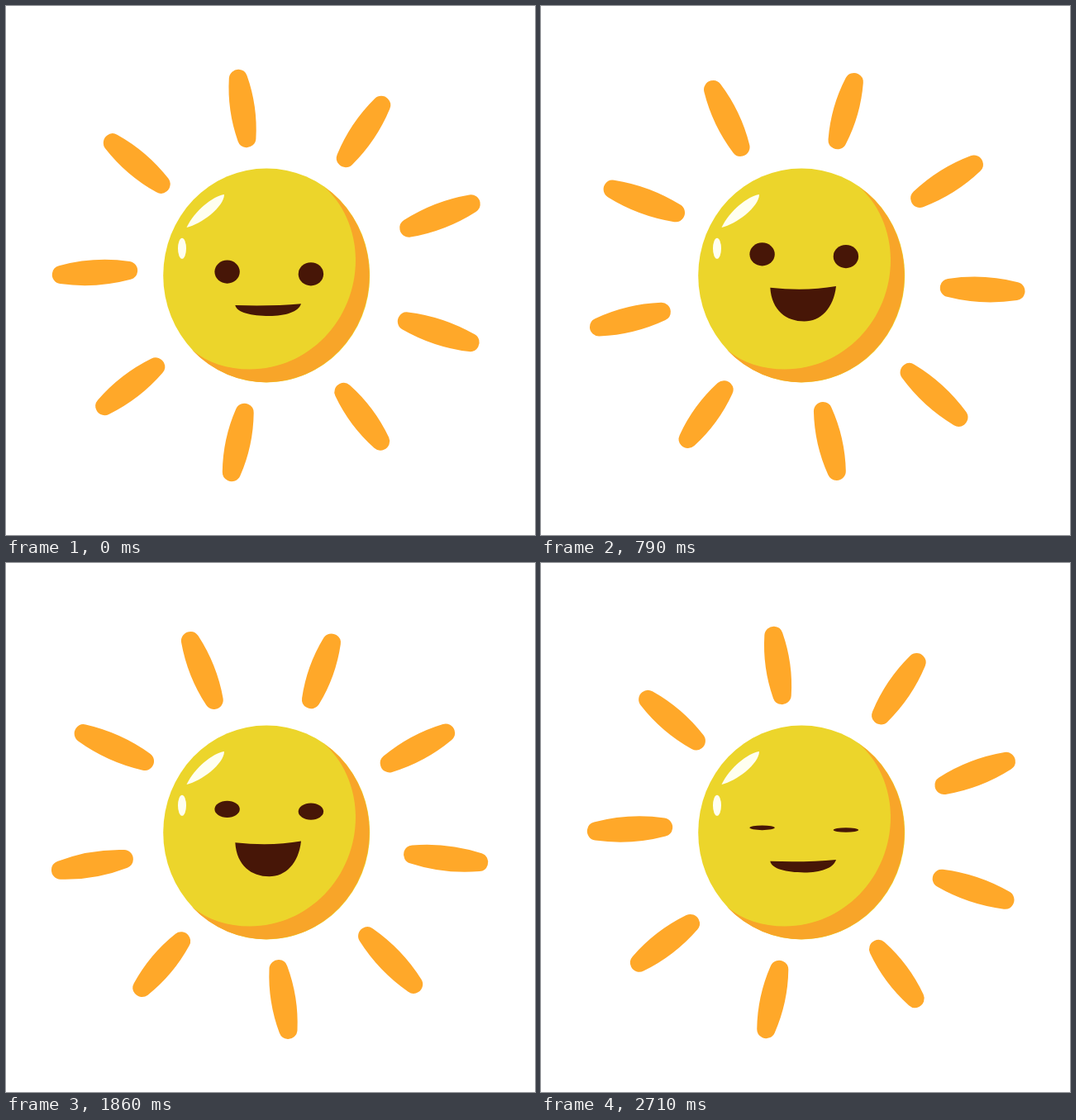
Animation, 640 px wide and 640 px high, one loop 2.78 s. Source, as an HTML page with a canvas:

```html
<!DOCTYPE html>
<html lang="en">
<head>
<meta charset="utf-8">
<title>Smiling sun</title>
<style>
  html, body { margin: 0; width: 100%; height: 100%; overflow: hidden; background: #fff; }
  canvas { display: block; width: 100vmin; height: 100vmin; }
</style>
</head>
<body>
<canvas id="stage" width="640" height="640"></canvas>
<script>
const ctx = document.getElementById('stage').getContext('2d');
const LOOP = 2780, STEPS = 39, CYCLE = 60;
const RAY = '#ffa829', SHADE = '#f8a529', YELLOW = '#ecd52b', DARK = '#471607', SHINE = '#fffff0';

// Ray ends: outer x, y, inner x, y
const rays = [
  [281, 88, 291.2, 160], [454, 120, 411, 184], [562.5, 239.5, 487.5, 268.5],
  [561.5, 407, 485, 381.5], [453, 526.5, 408.5, 467], [273, 564, 288.5, 492],
  [119.5, 484, 181, 436.5], [67, 325, 148, 320], [129, 165.5, 187.5, 215.5]
];

const crescent = new Path2D('M384 218A125 129.5 0 1 1 225 416C244 432 268 439.5 295 439.5' +
  'C366 439.5 423 380 423 307C423 272 408 238 384 218Z');
const glint = new Path2D('M264 228C250 230 228 248 218.5 268C236 264 264 243 264 228Z');

const smooth = (from, to, x) => {
  const u = Math.min(1, Math.max(0, (x - from) / (to - from)));
  return u * u * (3 - 2 * u);
};

function ellipse(x, y, rx, ry, color) {
  ctx.fillStyle = color;
  ctx.beginPath();
  ctx.ellipse(x, y, rx, ry, 0, 0, Math.PI * 2);
  ctx.fill();
}

function fill(path, color) {
  ctx.fillStyle = color;
  ctx.fill(path);
}

// Rounded bar whose sides bulge and meet both end caps smoothly
function drawRay([x1, y1, x2, y2]) {
  const r = 11.2, tilt = 0.2, quarter = Math.PI / 2;
  const length = Math.hypot(x2 - x1, y2 - y1);
  const bulge = r * Math.cos(tilt) + (length / 2 + r * Math.sin(tilt)) * Math.tan(tilt);
  const endX = length + r * Math.sin(tilt);
  ctx.save();
  ctx.translate(x1, y1);
  ctx.rotate(Math.atan2(y2 - y1, x2 - x1));
  ctx.beginPath();
  ctx.arc(0, 0, r, quarter + tilt, 3 * quarter - tilt);
  ctx.quadraticCurveTo(length / 2, -bulge, endX, -r * Math.cos(tilt));
  ctx.arc(length, 0, r, tilt - quarter, quarter - tilt);
  ctx.quadraticCurveTo(length / 2, bulge, -r * Math.sin(tilt), r * Math.cos(tilt));
  ctx.fill();
  ctx.restore();
}

function drawMouth(y, depth) {
  ctx.fillStyle = DARK;
  ctx.beginPath();
  ctx.moveTo(277.3, y);
  ctx.quadraticCurveTo(321, y + depth * 0.11, 357, y - 1.8);
  ctx.bezierCurveTo(354, y + depth * 0.62, 338, y + depth, 318.5, y + depth);
  ctx.bezierCurveTo(297, y + depth, 279, y + depth * 0.68, 277.3, y);
  ctx.fill();
}

function draw(time) {
  const step = Math.floor(time % LOOP / (LOOP / STEPS) + 0.05) % STEPS;
  const k = Math.round(step * (CYCLE + 1) / STEPS);
  const swing = 1 - Math.abs(2 * k / CYCLE - 1);
  const lift = 37.5 * swing;
  const smile = smooth(0, 18, k) - smooth(49, 60, k);
  const blink = smooth(33, 38, k) - smooth(38, 43, k) + smooth(49.4, 54.4, k);
  const eyeHeight = 14.1 * (1 - 0.8 * blink);

  ctx.clearRect(0, 0, 640, 640);

  ctx.save();
  ctx.translate(320, 320);
  ctx.rotate(smooth(0, 1, swing) * 40 * Math.PI / 180);
  ctx.translate(-320, -320);
  ctx.fillStyle = RAY;
  rays.forEach(drawRay);
  ctx.restore();

  ellipse(315.2, 325.9, 125, 129.5, YELLOW);
  fill(crescent, SHADE);
  fill(glint, SHINE);
  ellipse(213, 293.3, 5, 12.5, SHINE);

  ellipse(267.6, 321.6 - lift, 15.2, eyeHeight, DARK);
  ellipse(368.9, 324.3 - lift, 15.2, eyeHeight, DARK);
  drawMouth(362.1 - lift, 13 + 28 * smile);
}

function tick() {
  draw(performance.now());
  requestAnimationFrame(tick);
}
tick();
</script>
</body>
</html>
```
